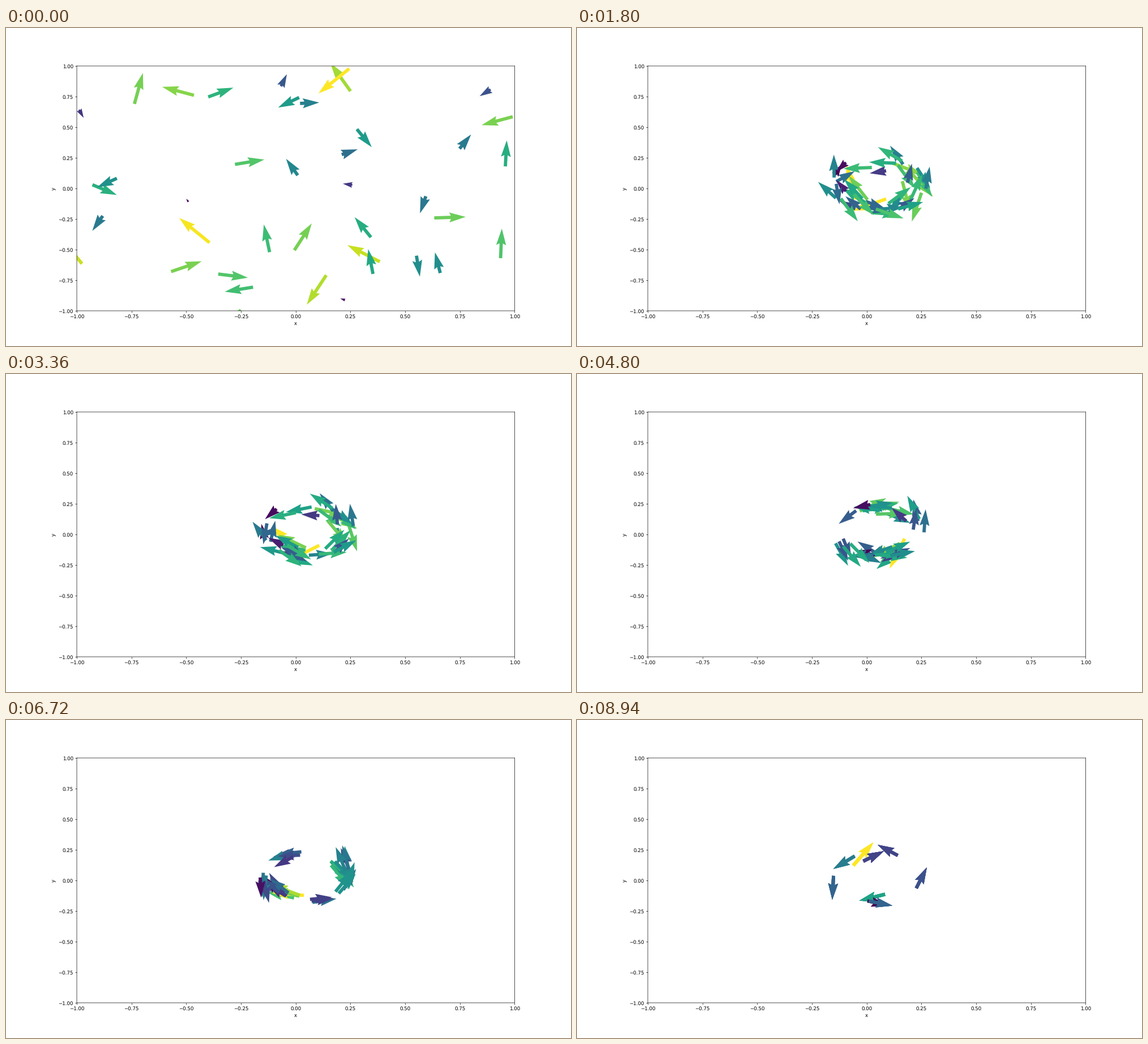
Animation, 998 px wide and 561 px high, one loop 9 s. Source, as a matplotlib script:

```python
import numpy as np
import matplotlib.pyplot as plt
from matplotlib.animation import FuncAnimation

W, H, DPI = 998, 561, 62.375
FRAMES, STEP = 150, 60
FALL = 13                       # frames until the swarm has drawn together
MEAN_LENGTH = 44                # average arrow length in pixels
HUB = np.array([0.048, 0.027])  # centre of the mill

# Clumps the swarm settles into: final angle (degrees), pace (0 to 1), members
CLOCKWISE = [(284, 0.58, 8), (139, 1.0, 5), (116, 0.2, 7)]
COUNTER = [(62, 0.2, 3), (121, 0.42, 4), (177, 0.32, 4),
           (257, 0.0, 1), (259, 0.32, 4), (333, 0.25, 4)]

rng = np.random.default_rng(7)


def members(clumps, turn, radius):
    """One row per particle: final angle, pace, turn per frame, radius."""
    return [(np.radians(angle), pace, turn, radius)
            for angle, pace, n in clumps for _ in range(n)]


angle, pace, turn, radius = np.array(
    members(CLOCKWISE, -0.225, 0.145) + members(COUNTER, 0.242, 0.2)).T
count = len(angle)

# Scattered start, and each particle's own departure from its clump
start = rng.uniform(-1, 1, (count, 2))
push = rng.uniform(-1, 1, (count, 2))
lag = rng.uniform(-1.5, 1.5, count)
drift = rng.uniform(-0.1, 0.05, count)
sway = rng.normal(0, 0.35, count)
haste = 0.25 - 0.8 * rng.random(count) ** 2.5


def polar(a):
    return np.column_stack([np.cos(a), np.sin(a)])


def mill(f):
    """Circling clumps; the spread within each one dies away."""
    loose = 1 - f / (FRAMES - 1)
    a = angle - turn * (FRAMES - 1 - f) + lag * loose ** 1.5
    r = np.where(turn > 0, radius, radius + 0.055 * loose ** 0.5)
    r = r + drift * loose
    heading = a + np.sign(turn) * np.pi / 2 + sway * loose
    speed = 0.88 + 0.4 * pace + haste * loose
    return HUB + r[:, None] * polar(a), polar(heading), speed


def swarm(f):
    pos, way, speed = mill(f)
    if f < FALL:
        w = f / FALL
        w = w * w * (3 - 2 * w)
        first = np.hypot(*push.T)
        pos = (1 - w) * start + w * pos
        inward = HUB - pos
        inward /= np.hypot(*inward.T)[:, None]
        way = ((1 - w) * push / first[:, None] + w * way
               + 2 * w * (1 - w) * inward)
        way /= np.hypot(*way.T)[:, None]
        speed = (1 - w) * first + w * speed
    vec = way * (MEAN_LENGTH * speed / speed.mean())[:, None]
    tone = (speed - speed.min()) / np.ptp(speed)
    return pos, vec, tone


plt.rcParams["text.hinting"] = "none"
fig, ax = plt.subplots(figsize=((W + 1e-4) / DPI, (H + 1e-4) / DPI), dpi=DPI)
fig.subplots_adjust(left=0.1253, right=0.9003, bottom=0.1106, top=0.8806)
ax.set(xlim=(-1, 1), ylim=(-1, 1), xlabel="x", ylabel="y")
for line in [*ax.spines.values(), *ax.get_xticklines(), *ax.get_yticklines()]:
    line.set_snap(False)

pos, vec, tone = swarm(0)
arrows = ax.quiver(*pos.T, *vec.T, tone, cmap="viridis", clim=(0, 1),
                   angles="uv", scale=1, scale_units="dots", width=0.0075)


def draw(f):
    pos, vec, tone = swarm(f)
    arrows.set_offsets(pos)
    arrows.set_UVC(*vec.T, tone)
    return [arrows]


anim = FuncAnimation(fig, draw, frames=FRAMES, interval=STEP,
                     init_func=lambda: draw(0), repeat=True, repeat_delay=0)
plt.show()
```
